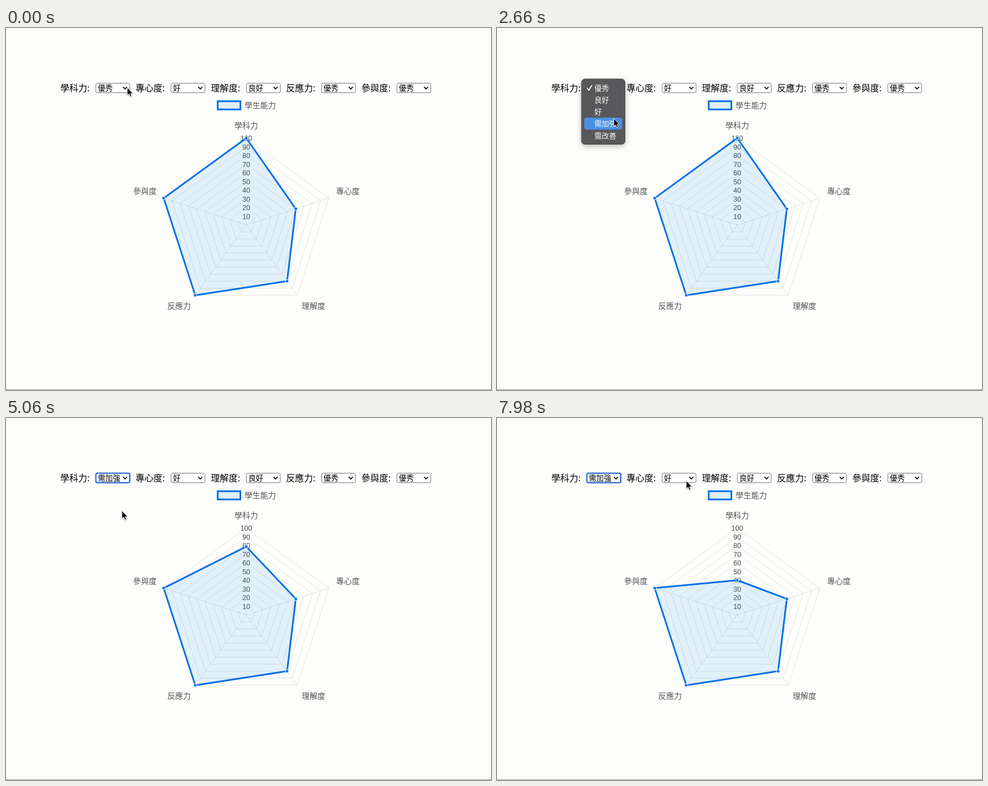
An HTML page for the animation above (8 s loop, 866 by 646 pixels).

```html
<!DOCTYPE html>
<html lang="zh-Hant">
<head>
<meta charset="utf-8">
<title>學生能力</title>
<style>
html, body { margin: 0; width: 100%; height: 100%; overflow: hidden; background: #fdfdfb; }
svg { display: block; width: 866px; height: 646px; }
text { font-family: "Noto Sans CJK TC", "Noto Sans CJK", sans-serif; white-space: pre; }
.tick { font: 12.5px "Liberation Sans", Arial, sans-serif; }
#menu { filter: drop-shadow(0 3px 5px rgba(0, 0, 0, .28)); }
#cursor { filter: drop-shadow(0 1px 1px rgba(0, 0, 0, .35)); }
</style>
</head>
<body>
<svg id="stage" viewBox="0 0 866 646">
  <rect width="866" height="646" fill="#fdfdfb"/>
  <rect y="645" width="866" height="1" fill="#999"/>
  <g id="controls"></g>
  <g id="legend"></g>
  <g id="grid" fill="none" stroke="#000" stroke-opacity=".1"></g>
  <g id="ticks"></g>
  <g id="series"></g>
  <g id="menu"></g>
  <path id="cursor" d="M-.5-1V13.2L2.8 10.4 5 15.4 7.4 14.4 5.3 9.8H9.8Z" stroke="#fff"/>
</svg>
<script>
const $ = id => document.getElementById(id);

function add(parent, tag, attrs, text) {
  const el = document.createElementNS("http://www.w3.org/2000/svg", tag);
  for (const key in attrs) el.setAttribute(key, attrs[key]);
  if (text !== undefined) el.textContent = text;
  parent.appendChild(el);
  return el;
}

// CJK text centred vertically on y
const label = (parent, text, x, y, size, fill, extra) =>
  add(parent, "text", { x, y: y + size * 0.38, "font-size": size, fill, ...extra }, text);

const BLUE = "#006fe6", FILL = "rgba(0,140,225,.11)";
const skills = ["學科力", "專心度", "理解度", "反應力", "參與度"];
const grades = ["優秀", "良好", "好", "需加強", "需改善"];
const scores = [100, 60, 80, 100, 100];
const initial = [0, 2, 1, 0, 0];

// Form row
const selects = skills.map((skill, i) => {
  const x = 97 + i * 134.35, left = x + 63, g = $("controls");
  label(g, skill + ":", x, 106.5, 16, "#000");
  const box = add(g, "rect", { x: left + .5, y: 98.5, width: 60.5, height: 17, rx: 2.5, fill: "#fff", stroke: "#767676" });
  const value = label(g, grades[initial[i]], left + 4, 107, 13.333, "#000");
  add(g, "path", { d: `M${left + 49} 105.2l3.6 3.6 3.6-3.6`, fill: "none", stroke: "#000", "stroke-width": 1.7 });
  return { box, value };
});

// Legend
add($("legend"), "rect", { x: 378, y: 130.7, width: 40.5, height: 14.6, fill: FILL, stroke: BLUE, "stroke-width": 3 });
label($("legend"), "學生能力", 426, 138, 14, "#555");

// Radar
const CX = 429, CY = 351.5, R = 155;
const polar = (value, i) => {
  const angle = i * Math.PI * 2 / 5, r = value / 100 * R;
  return [CX + r * Math.sin(angle), CY - r * Math.cos(angle)];
};
const polygon = values => values.map(polar).join(" ");

for (let v = 10; v <= 100; v += 10) {
  add($("grid"), "polygon", { points: polygon(Array(5).fill(v)) });
  const y = CY - v / 100 * R, w = v === 100 ? 25 : 18;
  add($("ticks"), "rect", { x: CX - w / 2, y: y - 8, width: w, height: 16, fill: "rgba(253,253,251,.75)" });
}
skills.forEach((_, i) => {
  const [x, y] = polar(100, i);
  add($("grid"), "path", { d: `M${CX} ${CY}L${x} ${y}` });
});
for (let v = 10; v <= 100; v += 10)
  add($("ticks"), "text", { class: "tick", x: CX, y: CY - v / 100 * R + 4.5, "text-anchor": "middle", fill: "#4c4c4c" }, v);

[[408, 174], [589.5, 290.5], [528, 495.3], [288, 495.3], [227, 290.5]]
  .forEach(([x, y], i) => label($("ticks"), skills[i], x, y, 14, "#555"));

const shape = add($("series"), "polygon", { fill: FILL, stroke: BLUE, "stroke-width": 3, "stroke-linejoin": "round" });
const dots = scores.map(() => add($("series"), "circle", { r: 3, fill: BLUE, stroke: "#fff", "stroke-width": 1 }));

// Popup menu
const ROW = 21.3, MENU_TOP = 96;
add($("menu"), "rect", { x: 151, y: 91, width: 77.5, height: 116.5, rx: 6, fill: "#58585a", stroke: "#444" });
const highlight = add($("menu"), "rect", { x: 156, width: 67.5, height: ROW, rx: 4, fill: "#4a90e6" });
add($("menu"), "path", { d: "M161 107.3l3 3.7 5.2-8.2", fill: "none", stroke: "#fff", "stroke-width": 1.7, "stroke-linecap": "round", "stroke-linejoin": "round" });
grades.forEach((grade, i) =>
  label($("menu"), grade, 174, MENU_TOP + ROW * (i + .5), 13, "#fff", { "font-weight": 500 }));

// Timeline in 60 fps ticks
const LOOP = 8000, OPEN = 22, FADE = 86, GONE = 95.3, CHANGE = 101, CHART = 103, CHART_TICKS = 58;
const path = [
  [0, 217, 107], [16, 208, 113], [42, 208, 113], [57, 209, 162.5],
  [66, 207.5, 166.5], [115, 207.5, 166.5], [130, 208.5, 168],
  [138, 208.5, 168], [171, 338.5, 113]
];
const clamp = v => Math.min(1, Math.max(0, v));

function cursorAt(tick) {
  const n = Math.max(1, path.findIndex(p => p[0] >= tick));
  const [t0, x0, y0] = path[n - 1], [t1, x1, y1] = path[n];
  const p = clamp((tick - t0) / (t1 - t0)), e = p * p * (3 - 2 * p);
  return [x0 + (x1 - x0) * e, y0 + (y1 - y0) * e];
}

// Playback cadence: every three ticks are held 20, 100 and 20 ms
function tickAt(ms) {
  const r = ms % 140;
  return Math.floor(ms / 140) * 3 + (r < 20 ? 0 : r < 120 ? 1 : 2);
}

function render(ms) {
  const tick = tickAt(ms);
  const [x, y] = cursorAt(tick);
  $("cursor").setAttribute("transform", `translate(${x} ${y})`);

  $("menu").style.opacity = tick < OPEN ? 0 : clamp((GONE - tick) / (GONE - FADE));
  const row = Math.min(4, Math.max(0, Math.floor((y - MENU_TOP) / ROW)));
  highlight.setAttribute("y", MENU_TOP + row * ROW);

  const changed = tick >= CHANGE, { box, value } = selects[0];
  value.textContent = grades[changed ? 3 : 0];
  box.setAttribute("stroke", changed ? "#1459cf" : "#767676");
  box.setAttribute("stroke-width", changed ? 2 : 1);

  const p = clamp((tick - CHART) / CHART_TICKS);
  const values = [40 + 60 * (1 - p) ** 4, ...scores.slice(1)];
  shape.setAttribute("points", polygon(values));
  dots.forEach((dot, i) => {
    const [cx, cy] = polar(values[i], i);
    dot.setAttribute("cx", cx);
    dot.setAttribute("cy", cy);
  });
}

// A small lead keeps clock rounding from showing the previous tick
const LEAD = 4, start = performance.now() - LEAD;
function loop() {
  render((performance.now() - start) % LOOP);
  requestAnimationFrame(loop);
}
loop();
</script>
</body>
</html>
```
